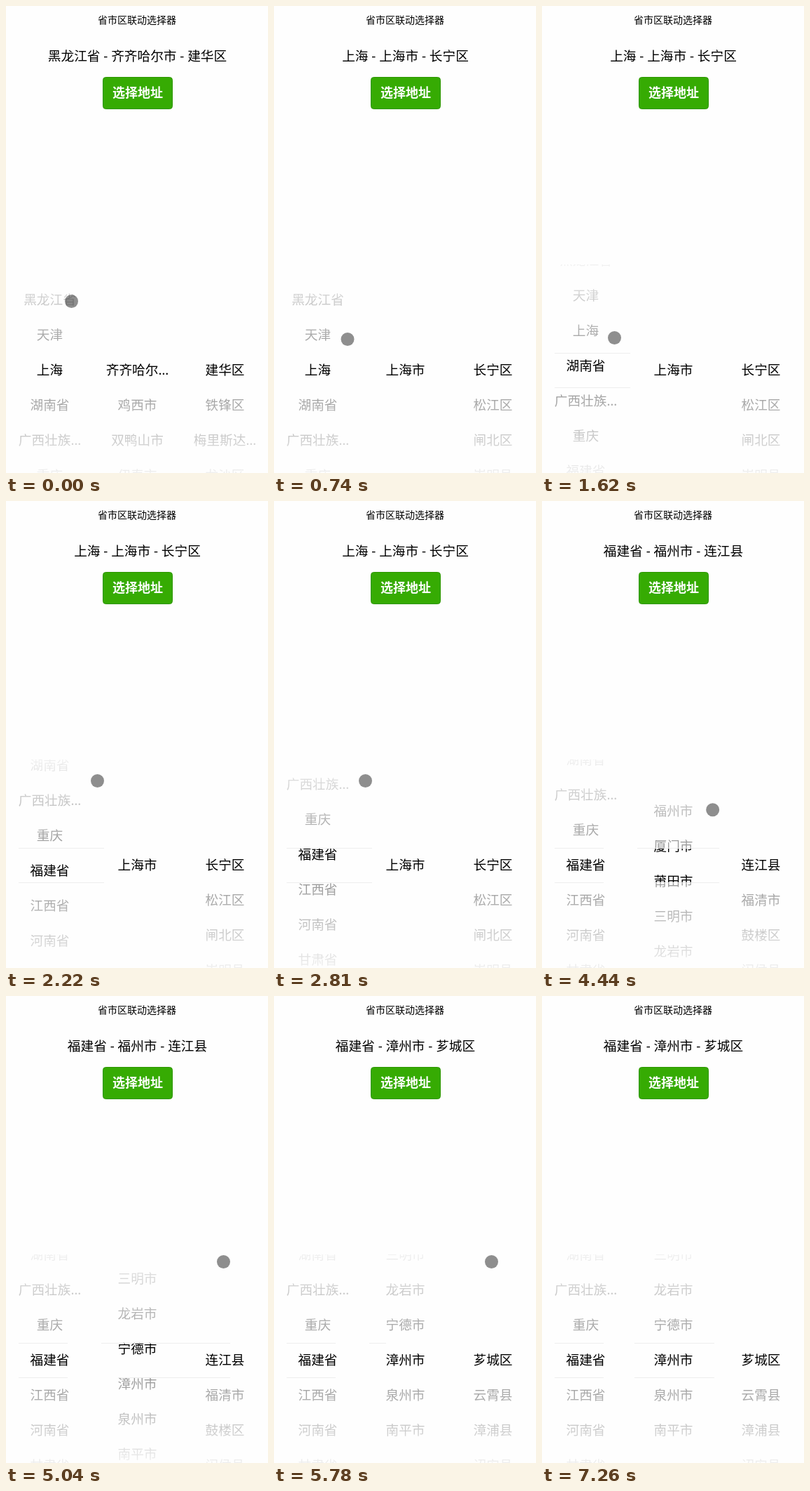
Recreate the animation shown at these times as an HTML page. Size 374 by 665 pixels, loop 7710 ms.

```html
<!DOCTYPE html>
<html lang="zh-CN">
<head>
<meta charset="utf-8">
<title>省市区联动选择器</title>
<style>
  html, body { margin: 0; width: 100%; height: 100%; overflow: hidden; background: #fefefe; }
  svg { display: block; width: 374px; height: 665px; }
  text { font-family: "Noto Sans", "Noto Sans CJK SC", "Noto Sans CJK", sans-serif; font-size: 18.67px; text-anchor: middle; }
</style>
</head>
<body>
<svg viewBox="0 0 374 665">
  <defs>
    <clipPath id="panel"><rect y="368" width="374" height="300"/></clipPath>
    <linearGradient id="fadeTop" x1="0" y1="0" x2="0" y2="1">
      <stop offset="0" stop-color="#fefefe" stop-opacity=".95"/>
      <stop offset="1" stop-color="#fefefe" stop-opacity=".6"/>
    </linearGradient>
    <linearGradient id="fadeBottom" x1="0" y1="0" x2="0" y2="1">
      <stop offset="0" stop-color="#fefefe" stop-opacity=".6"/>
      <stop offset="1" stop-color="#fefefe" stop-opacity=".95"/>
    </linearGradient>
  </defs>
  <rect width="374" height="665" fill="#fefefe"/>
  <text x="187" y="25.3" style="font-size:14px">省市区联动选择器</text>
  <text id="result" x="187.5" y="78"></text>
  <rect x="138.5" y="101.5" width="99" height="45" rx="4" fill="#36ab03" stroke="#2d9500"/>
  <text x="188" y="130.3" fill="#fff" style="font-size:18px;font-weight:700">选择地址</text>
  <g id="columns" clip-path="url(#panel)"></g>
  <rect y="368" width="374" height="126" fill="url(#fadeTop)"/>
  <rect y="544" width="374" height="124" fill="url(#fadeBottom)"/>
  <path id="lines" stroke="#eee" fill="none"/>
  <circle id="touch" r="9.5" fill="#000" fill-opacity=".44"/>
</svg>
<script>
const LOOP = 7710, STEP = 148.4, LEAD = 13;
const ROW = 50, BASE = 525, CENTERS = [62.5, 187.5, 312.5];
const $ = id => document.getElementById(id);

const provinces = '黑龙江省 天津 上海 湖南省 广西壮族… 重庆 福建省 江西省 河南省 甘肃省';

// Each choice takes effect at a step and refills the dependent columns.
const choices = [
  { at: 0, result: '黑龙江省 - 齐齐哈尔市 - 建华区',
    cities: '齐齐哈尔… 鸡西市 双鸭山市 伊春市', areas: '建华区 铁锋区 梅里斯达… 龙沙区' },
  { at: 2, result: '上海 - 上海市 - 长宁区',
    cities: '上海市', areas: '长宁区 松江区 闸北区 崇明县' },
  { at: 22, result: '福建省 - 福州市 - 连江县',
    cities: '福州市 厦门市 莆田市 三明市 龙岩市 宁德市 漳州市 泉州市 南平市',
    areas: '连江县 福清市 鼓楼区 闽侯县' },
  { at: 37, result: '福建省 - 漳州市 - 芗城区',
    cities: '福州市 厦门市 莆田市 三明市 龙岩市 宁德市 漳州市 泉州市 南平市',
    areas: '芗城区 云霄县 漳浦县 诏安县' }
];

// Keys: [step, value...]
const provinceScroll = [[9, 100], [10, 118], [11, 156], [12, 202], [13, 245], [14, 274],
  [15, 292], [16, 304], [17, 311], [19, 315], [20, 308], [21, 302], [22, 300]];
const cityScroll = [[25, 0], [27, 14], [29, 45], [31, 110], [32, 158], [33, 218],
  [34, 266], [35, 289], [36, 298], [37, 300]];
const touchPath = [[0, 93.5, 420.5], [2, 93.5, 420.5], [8, 116.5, 528.5], [9, 116.5, 528.5],
  [10, 112, 511], [11, 103.5, 472.5], [12, 112, 432], [14, 130.5, 398.5], [19, 130.5, 398.5],
  [24, 165, 508], [25, 167.5, 513.5], [27, 180, 500], [29, 215, 468], [32, 301, 383],
  [33, 310.5, 378.5], [42, 310.5, 378.5], [43, 302, 310], [44, 288, 215], [45, 272, 177.5],
  [46, 256, 220], [47, 236.5, 330], [48, 142.5, 655]];
const TOUCH_END = 49;

function sample(keys, s) {
  let i = 0;
  while (i < keys.length - 1 && keys[i + 1][0] <= s) i++;
  const a = keys[i], b = keys[i + 1];
  if (!b || s <= a[0]) return a.slice(1);
  const u = (s - a[0]) / (b[0] - a[0]);
  return a.slice(1).map((v, n) => v + (b[n + 1] - v) * u);
}

const columns = CENTERS.map(() => {
  const g = document.createElementNS('http://www.w3.org/2000/svg', 'g');
  $('columns').append(g);
  return g;
});

function fill(c, names) {
  columns[c].replaceChildren(...names.split(' ').map((name, i) => {
    const t = document.createElementNS('http://www.w3.org/2000/svg', 'text');
    t.setAttribute('x', CENTERS[c]);
    t.setAttribute('y', BASE + i * ROW);
    t.textContent = name;
    return t;
  }));
}

const scrollTo = (c, y) => columns[c].setAttribute('transform', `translate(0 ${-y})`);

// Spans of the selection rule: upper row, then lower row.
function ruleSpans(s, x) {
  if (s < 10) return [[], []];
  if (s < 22) { const w = [[18, s < 13 ? 126 : 140]]; return [w, w]; }
  const left = [18, 88], edge = Math.round(x + 9.5);
  if (s < 26) return [s < 24 ? [left] : [left, [136, 178]], [left]];
  if (s < 37) return [[left, [136, edge]], [left, [160, edge]]];
  if (s < 48) return [[left, [136, 160]], [left]];
  return [[left, [132, 246]], [left, [132, 246]]];
}

let shown = null;
function draw(ms) {
  const s = Math.floor((ms % LOOP + LEAD) / STEP);
  const choice = choices.filter(c => c.at <= s).pop();
  if (choice !== shown) {
    shown = choice;
    $('result').textContent = choice.result;
    fill(1, choice.cities);
    fill(2, choice.areas);
  }
  scrollTo(0, sample(provinceScroll, s)[0]);
  scrollTo(1, sample(cityScroll, s)[0]);

  const [x, y] = sample(touchPath, s), touch = $('touch');
  touch.setAttribute('cx', x);
  touch.setAttribute('cy', y);
  touch.setAttribute('visibility', s < TOUCH_END ? 'visible' : 'hidden');

  const rows = ruleSpans(s, x);
  $('lines').setAttribute('d', rows.map((spans, i) =>
    spans.map(([a, b]) => `M${a} ${i ? 543.5 : 494.5}H${b}`).join('')).join(''));
}

fill(0, provinces);
const start = performance.now();
function tick() {
  draw(performance.now() - start);
  requestAnimationFrame(tick);
}
tick();
</script>
</body>
</html>
```
